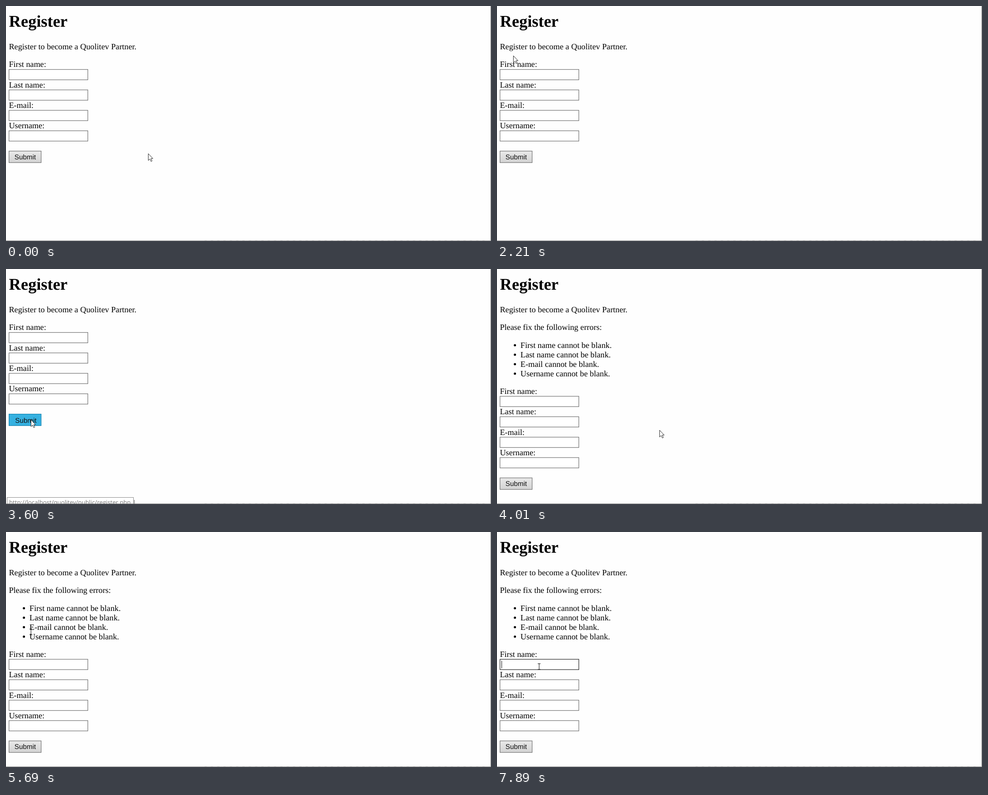
Write an HTML page that moves like this. It is 1075 px wide and 521 px high and loops after 8 s.

```html
<!DOCTYPE html>
<html lang="en">
<head>
<meta charset="utf-8">
<title>Register</title>
<style>
  html, body { margin: 0; width: 100%; height: 100%; overflow: hidden; background: #fefefe; }
  svg { display: block; width: 1075px; height: 521px; }
  text { font: 18.25px "Liberation Serif", "Times New Roman", serif; fill: #000; text-rendering: geometricPrecision; }
  .title { font-size: 36.5px; font-weight: bold; }
  .button { font: 15.3px "Liberation Sans", Arial, sans-serif; fill: #111; }
  .url { font: 13.2px "Open Sans", "Noto Sans", sans-serif; fill: #777; }
</style>
</head>
<body>
<svg viewBox="0 0 1075 521">
  <defs>
    <linearGradient id="grey" x2="0" y2="1">
      <stop stop-color="#e9e9e9"/><stop offset="1" stop-color="#d3d3d3"/>
    </linearGradient>
  </defs>
  <text class="title" x="6.6" y="46">Register</text>
  <text x="6.4" y="96">Register to become a Quolitev Partner.</text>
  <g id="errors"><text x="6.4" y="135.4">Please fix the following errors:</text></g>
  <g id="form">
    <g id="submit">
      <rect x="6.6" y="321.6" width="71.3" height="25.6" stroke-width="1.2"/>
      <text class="button" x="18.7" y="339.8">Submit</text>
    </g>
  </g>
  <path id="caret" d="M10.5 285.5V302" stroke="#000"/>
  <g id="status">
    <rect x="2.5" y="506.5" width="280" height="20" fill="#fff" stroke="#888"/>
    <path d="M284.5 512V521" stroke="#888" stroke-width="1.5"/>
    <text class="url" x="7" y="522">http://localhost/quolitev/public/register.php</text>
  </g>
  <path d="M0 520.5H1074.5V0" fill="none" stroke="#7c7c7c"/>
  <path d="M440 520.5H1070" stroke="#333" stroke-opacity=".3" stroke-dasharray="5 9"/>
  <path id="arrow" d="M0 0V15L3.5 11.8L6 17.3L8.4 16.2L5.9 10.8H10.2Z" fill="#fff" stroke="#222" stroke-linejoin="round"/>
  <path id="beam" d="M-3 -6.5H-.8L0 -6L.8 -6.5H3M0 -6V6M-3 6.5H-.8L0 6L.8 6.5H3" fill="none" stroke="#222" stroke-width="1.1"/>
</svg>
<script>
const LOOP = 8000;
const FIRST_MOVE = 530, STEP = 139; // the picture is refreshed in steps, in ms
const HOVER = 18, PRESS = 22, ERRORS = 23, LEAVE = 24, FOCUS = 52; // in steps
const ROW = 45.3, ERROR_HEIGHT = 141.5;
const fields = ["First name", "Last name", "E-mail", "Username"];
const $ = id => document.getElementById(id);

function add(parent, tag, attrs, content = "") {
  const node = document.createElementNS("http://www.w3.org/2000/svg", tag);
  for (const key in attrs) node.setAttribute(key, attrs[key]);
  node.textContent = content;
  $(parent).append(node);
  return node;
}

const boxes = fields.map((name, i) => {
  const y = i * ROW;
  add("errors", "circle", { cx: 39.7, cy: 169 + i * 21, r: 2.5 });
  add("errors", "text", { x: 52, y: 174.5 + i * 21 }, name + " cannot be blank.");
  add("form", "text", { x: 6.4, y: 135.4 + y }, name + ":");
  return add("form", "rect", { x: 6.6, y: 140.7 + y, width: 174.8, height: 22.9, fill: "#fff", "stroke-width": 1.2 });
});

// Turning points of the pointer: step, x, y.
const path = [
  [-1, 315, 327], [2, 339, 230], [7, 180, 50], [12, 36, 110], [14, 15, 190],
  [18, 55, 334], [22, 55, 334], [25, 360, 357], [27, 370, 361],
  [28, 360, 346], [33, 88, 67], [35, 54, 160], [37, 55, 221],
  [39, 117, 240], [42, 230, 178], [45, 152, 176], [50, 95, 312], [53, 93, 298]
];

// Slope at a key point; flat at extremes, so the curve never overshoots.
function slope(i, axis) {
  const before = path[i - 1], here = path[i], after = path[i + 1];
  if (!before || !after) return 0;
  const turns = (here[axis] - before[axis]) * (after[axis] - here[axis]) <= 0;
  return turns ? 0 : (after[axis] - before[axis]) / (after[0] - before[0]);
}

function pointer(step) {
  const next = path.findIndex(key => key[0] > step);
  if (next < 0) return path.at(-1).slice(1);
  const i = Math.max(0, next - 1), a = path[i], b = path[i + 1];
  const span = b[0] - a[0], u = Math.max(0, (step - a[0]) / span), v = 1 - u;
  return [1, 2].map(axis =>
    v * v * (1 + 2 * u) * a[axis] + u * u * (3 - 2 * u) * b[axis] +
    u * v * span * (v * slope(i, axis) - u * slope(i + 1, axis)));
}

function overText(x, y, shift) {
  const within = (left, right, top, bottom) => x >= left && x <= right && y >= top && y <= bottom;
  if (within(6, 290, 81, 101)) return true;
  if (shift && (within(6, 232, 120, 141) || within(52, 254, 158, 243))) return true;
  return fields.some((_, i) => {
    const top = 120 + shift + i * ROW;
    return within(6, 88, top, top + 20) || within(6, 182, top + 20, top + 44);
  });
}

const show = (id, on) => $(id).setAttribute("visibility", on ? "visible" : "hidden");

function paintButton(fill, stroke, offset) {
  const [rect, label] = $("submit").children;
  rect.setAttribute("fill", fill);
  rect.setAttribute("stroke", stroke);
  label.setAttribute("transform", `translate(${offset} ${offset})`);
}

function draw(time) {
  const step = Math.floor((time + 10 - FIRST_MOVE) / STEP);
  const [x, y] = pointer(step);
  const failed = step >= ERRORS, focused = step >= FOCUS;
  const shift = failed ? ERROR_HEIGHT : 0;
  const beam = overText(x, y, shift);

  show("errors", failed);
  $("form").setAttribute("transform", `translate(0 ${shift})`);
  boxes.forEach((box, i) => box.setAttribute("stroke", focused && i === 0 ? "#222" : "#707070"));
  show("caret", focused);

  if (step >= PRESS && !failed) paintButton("#35b1e1", "#1583b0", 1.5);
  else if (step >= HOVER && !failed) paintButton("#c5e6f6", "#2c8cb8", 0);
  else paintButton("url(#grey)", "#707070", 0);

  show("status", step >= HOVER && step < LEAVE);
  show("beam", beam);
  show("arrow", !beam);
  $(beam ? "beam" : "arrow").setAttribute("transform", `translate(${x + .4} ${y + .4})`);
}

const began = performance.now();
function tick() {
  draw((performance.now() - began) % LOOP);
  requestAnimationFrame(tick);
}
tick();
</script>
</body>
</html>
```
